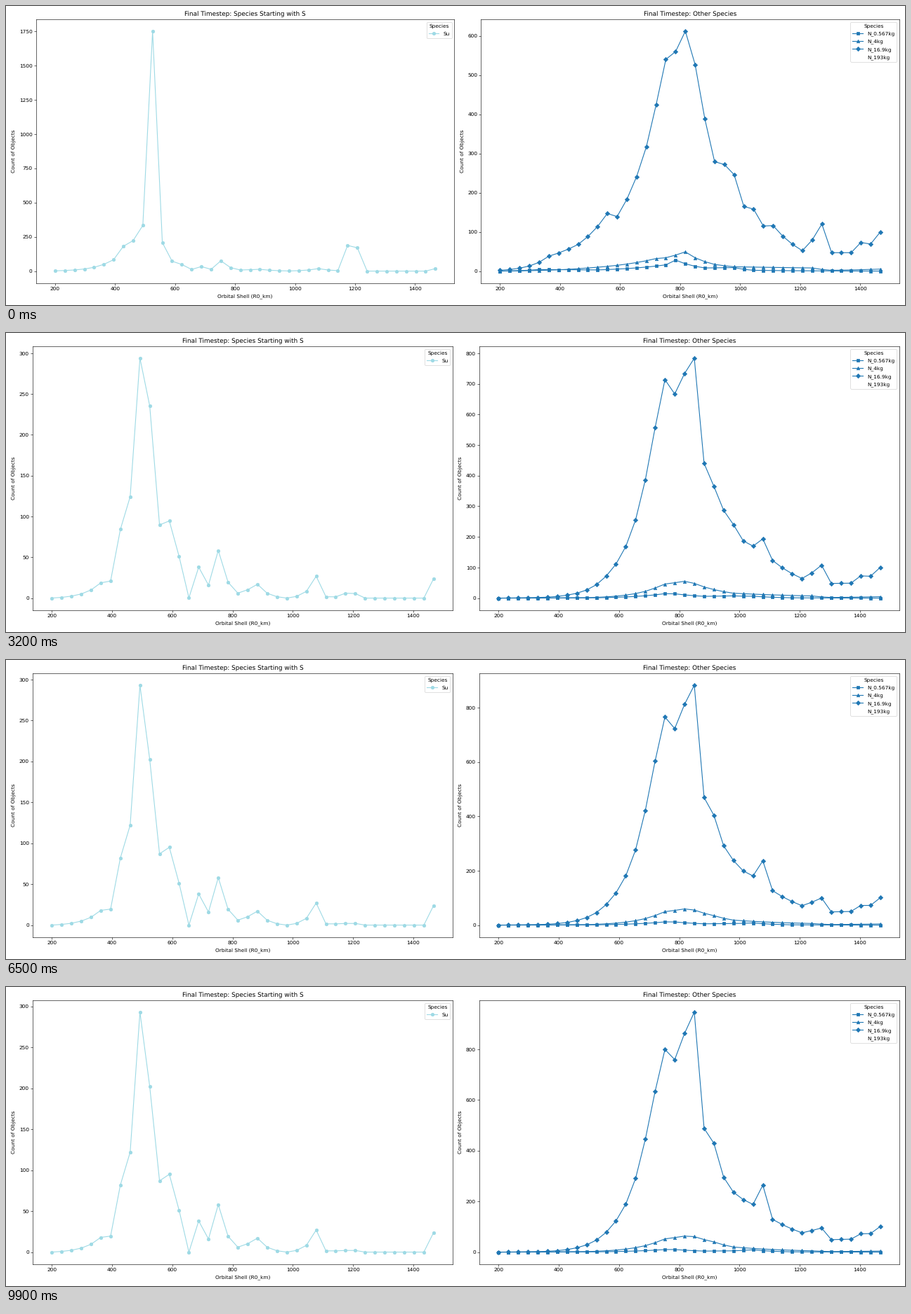
Recreate the animation shown at these times as a matplotlib script. Size 1280 by 427 pixels, loop 10000 ms.

```python
import numpy as np
import matplotlib.pyplot as plt
from matplotlib.animation import FuncAnimation

W, H, DPI = 1280, 427, 64
FRAMES, INTERVAL = 100, 100
K = 5 / 6  # scale of all point sizes at this dpi
TOP, BOTTOM, RIGHT = 18.8, 395.7, 1272
PALE, BLUE = "#9edae5", "#1f77b4"

plt.rcParams.update({
    "font.family": "DejaVu Sans",
    "font.size": 10 * K,
    "text.hinting": "none",
    "lines.linewidth": 1.5 * K,
    "lines.markersize": 6 * K,
    "lines.markeredgewidth": K,
    "patch.linewidth": K,
    "axes.linewidth": 0.8 * K,
    "axes.labelpad": 4 * K,
    "axes.titlepad": 6 * K,
    "legend.labelspacing": 0.56,
})
for side in ("xtick", "ytick"):
    plt.rcParams[f"{side}.major.size"] = 3.5 * K
    plt.rcParams[f"{side}.major.width"] = 0.8 * K
    plt.rcParams[f"{side}.major.pad"] = 3.5 * K

shells = 200 + 32.5 * np.arange(40)
steps = np.arange(FRAMES)


def profiles(knots):
    """One curve over all shells per state, geometric between the knots."""
    places = list(knots)
    states = np.log1p(np.array(list(knots.values())).T)
    return np.array([np.expm1(np.interp(np.arange(len(shells)), places, state))
                     for state in states])


def history(knots, phase):
    """Counts per frame: a blend of the states either side of the phase."""
    curves = profiles(knots)
    low = np.minimum(phase.astype(int), len(curves) - 2)
    mix = (phase - low)[:, None]
    return curves[low] * (1 - mix) + curves[low + 1] * mix


def settling(tau, early=11):
    """Phase 0 to 1 until the early step, then 1 to 2, ever slower."""
    clock = np.log1p(steps / tau)
    return np.interp(clock, clock[[0, early, -1]], [0, 1, 2])


# satellites relax from launch to balance
su = history({
    0: (2, 0), 5: (49, 18), 6: (83, 19.5), 7: (181, 82), 8: (222, 122),
    9: (333, 293), 10: (1750, 202), 11: (208, 87), 12: (72, 95), 13: (48, 51),
    14: (12, 0), 15: (33, 38), 16: (13, 16), 17: (75, 58), 19: (8, 6),
    21: (13, 17), 24: (1, 0), 27: (18, 27), 28: (8, 1.5), 29: (3, 1.5),
    30: (187, 2), 31: (170, 2), 32: (0, 0), 38: (0, 0), 39: (18, 24),
}, 1 - np.exp(-(steps / 11) ** 1.26))

# debris: start, early and late counts at the bends of each curve
small = history({
    0: (0, 0, 0), 4: (4, 0, 0), 10: (3, 1, 1), 17: (16, 18, 10),
    18: (28, 17, 10), 21: (8, 7, 4), 24: (9, 9, 5), 26: (2, 4, 9),
    30: (1, 1, 1), 39: (0, 0, 0),
}, settling(8))

light = history({
    0: (0, 0, 0), 9: (8, 1, 2), 16: (32, 31, 37), 17: (34, 43, 52),
    19: (49, 51, 63), 20: (34, 42, 61), 22: (17, 22, 40), 24: (11, 14, 20),
    32: (8, 8, 5), 34: (2, 2, 2), 39: (5, 5, 4),
}, settling(60))

heavy = history({
    0: (2, 0, 0), 5: (38, 3, 3), 8: (68, 15, 17), 11: (147, 67, 78),
    12: (139, 102, 123), 15: (317, 342, 445), 16: (424, 499, 634),
    17: (540, 649, 799), 18: (560, 597, 759), 19: (612, 636, 862),
    20: (527, 661, 946), 21: (388, 404, 488), 22: (279, 317, 429),
    23: (272, 280, 295), 24: (246, 243, 236), 25: (165, 172, 207),
    26: (158, 156, 188), 27: (115, 140, 264), 28: (116, 118, 129),
    31: (52, 55, 76), 33: (120, 117, 95), 34: (47, 47, 49),
    36: (47, 47, 51), 37: (73, 73, 72), 38: (69, 70, 73), 39: (100, 100, 101),
}, settling(8))

fig, (left, right) = plt.subplots(1, 2, figsize=(W / DPI, H / DPI), dpi=DPI)


def dress(ax, title, legend_lines):
    ax.set_title(title)
    ax.set_xlabel("Orbital Shell (R0_km)")
    ax.set_ylabel("Count of Objects", labelpad=5.9 * K)
    margin = 0.05 * (shells[-1] - shells[0])
    ax.set_xlim(shells[0] - margin, shells[-1] + margin)
    ax.legend(handles=legend_lines, title="Species", loc="upper right")


def series(ax, label, color, marker, counts):
    line, = ax.plot(shells, counts[0], color=color, marker=marker, label=label)
    return line, counts


left_series = [series(left, "Su", PALE, "o", su)]
right_series = [
    series(right, "N_0.567kg", BLUE, "s", small),
    series(right, "N_4kg", BLUE, "^", light),
    series(right, "N_16.9kg", BLUE, "D", heavy),
]
unseen, = right.plot([], [], linestyle="None", label="N_193kg")
dress(left, "Final Timestep: Species Starting with S", [s[0] for s in left_series])
dress(right, "Final Timestep: Other Species", [s[0] for s in right_series] + [unseen])


def place(ax, x, width):
    ax.set_position([x / W, 1 - BOTTOM / H, width / W, (BOTTOM - TOP) / H])


def update(frame):
    for ax, group in ((left, left_series), (right, right_series)):
        for line, counts in group:
            line.set_ydata(counts[frame])
        peak = max(counts[frame].max() for _, counts in group)
        ax.set_ylim(-0.05 * peak, 1.05 * peak)
    # four-digit tick labels need a wider left margin
    wide = left.get_ylim()[1] >= 1000
    x, width = (42.8, 595.6) if wide else (38.1, 597.95)
    place(left, x, width)
    place(right, RIGHT - width, width)
    return []


anim = FuncAnimation(fig, update, frames=FRAMES, interval=INTERVAL,
                     init_func=lambda: update(0), repeat=True, blit=False)
plt.show()
```
